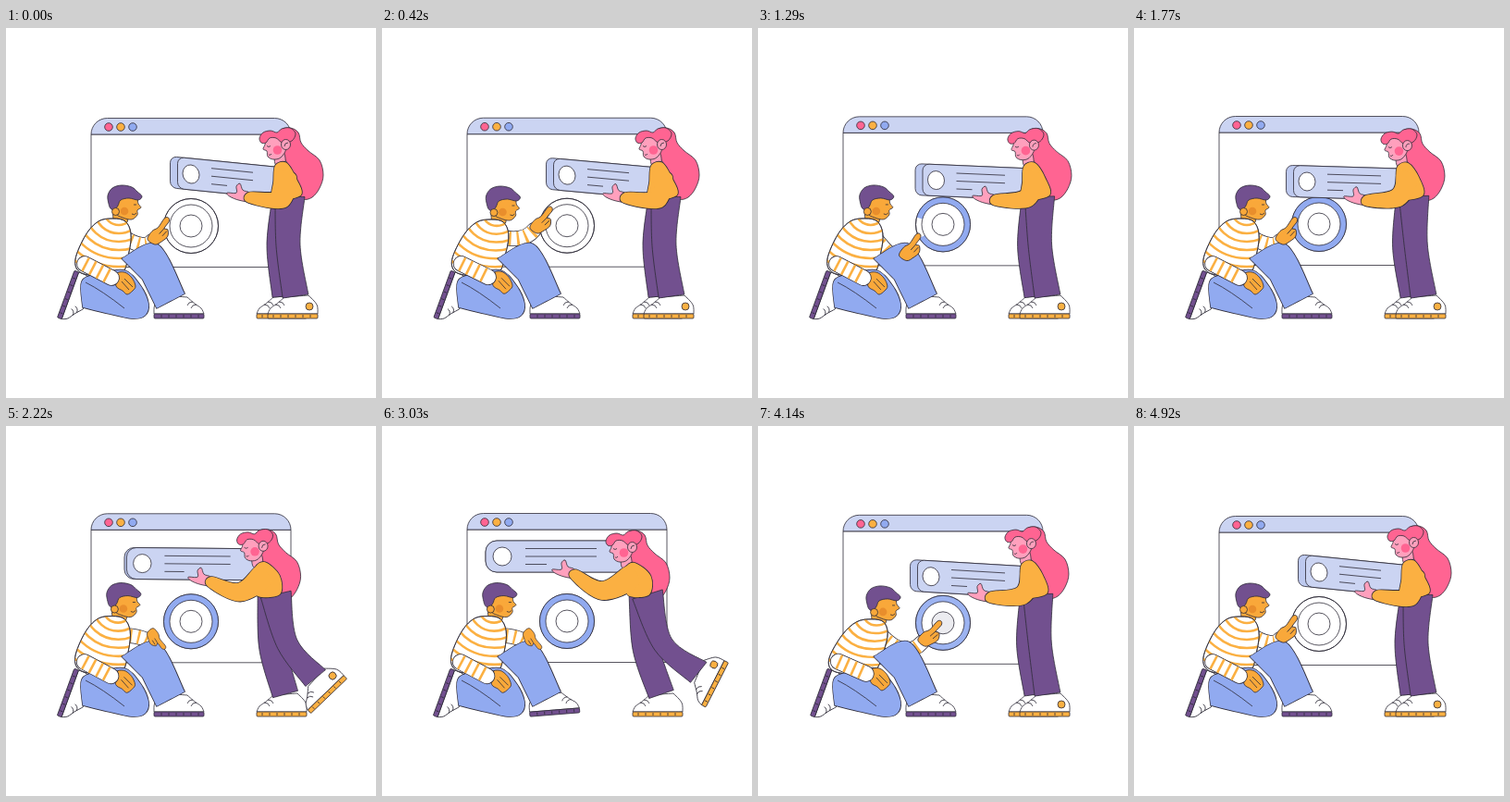
Animation, 400 px wide and 400 px high, one loop 4950 ms. Source, as an HTML page with a canvas:

```html
<!DOCTYPE html>
<html lang="en">
<head>
<meta charset="utf-8">
<title>Building a page</title>
<style>
html, body { margin: 0; width: 100%; height: 100%; overflow: hidden; background: #fff; }
canvas { display: block; width: 400px; height: 400px; }
</style>
</head>
<body>
<canvas id="stage"></canvas>
<script>
const LOOP = 4950, STEP = 30, TAU = Math.PI * 2, DEG = TAU / 360;
const INK = '#2e2b38', ORANGE = '#fbb042', TAN = '#f9a83a', PINK = '#ff6492', SKIN = '#ffa0bd',
  PURPLE = '#72508f', BLUE = '#91aaf0', PALE = '#cbd4f2', WHITE = '#fff';

const canvas = document.getElementById('stage');
const dpr = window.devicePixelRatio || 1;
canvas.width = canvas.height = 400 * dpr;
const c = canvas.getContext('2d');

function ease(t, from, to) {
  const u = Math.min(1, Math.max(0, (t - from) / (to - from)));
  return u * u * (3 - 2 * u);
}
const pulse = (t, a, b, d, e) => ease(t, a, b) - ease(t, d, e);
const mix = (a, b, u) => a.map((v, i) => v + (b[i] - v) * u);

function paint(fill, line = INK) {
  if (fill) { c.fillStyle = fill; c.fill(); }
  if (line) { c.strokeStyle = line; c.stroke(); }
}

// Closed smooth path; a repeated point makes a corner.
function trace(p) {
  const n = p.length / 2;
  const at = i => { const j = (i + n) % n * 2; return [p[j], p[j + 1]]; };
  c.beginPath();
  c.moveTo(p[0], p[1]);
  for (let i = 0; i < n; i++) {
    const [ax, ay] = at(i - 1), [bx, by] = at(i), [dx, dy] = at(i + 1), [ex, ey] = at(i + 2);
    if (bx === dx && by === dy) continue;
    c.bezierCurveTo(bx + (dx - ax) / 6, by + (dy - ay) / 6, dx - (ex - bx) / 6, dy - (ey - by) / 6, dx, dy);
  }
  c.closePath();
}
function blob(p, fill, line) { trace(p); paint(fill, line); }

// Several shapes sharing one outer outline.
function merge(fill, ...shapes) {
  c.lineWidth *= 2;
  shapes.forEach(p => blob(p));
  c.lineWidth /= 2;
  shapes.forEach(p => blob(p, fill, null));
}

// Outline around joints [x, y, radius]; cut ends are square.
function limb(joints, cut) {
  const left = [], right = [], last = joints.length - 1;
  joints.forEach(([x, y, r], i) => {
    const a = joints[Math.max(i - 1, 0)], b = joints[Math.min(i + 1, last)];
    const dir = Math.atan2(b[1] - a[1], b[0] - a[0]);
    const nx = -Math.sin(dir) * r, ny = Math.cos(dir) * r;
    for (let k = cut && i % last === 0 ? 2 : 1; k; k--) {
      left.push([x + nx, y + ny]);
      right.unshift([x - nx, y - ny]);
    }
  });
  return [...left, ...right].flat();
}

function oval(x, y, rx, ry, fill, line) {
  c.beginPath();
  c.ellipse(x, y, rx, ry, 0, 0, TAU);
  paint(fill, line);
}
const disc = (x, y, r, fill, line) => oval(x, y, r, r, fill, line);

function box(x, y, w, h, radii, fill) {
  c.beginPath();
  c.roundRect(x, y, w, h, radii);
  paint(fill);
}

function curve(d) {
  c.strokeStyle = INK;
  c.stroke(new Path2D(d));
}

function group(x, y, draw, angle = 0, sx = 1, sy = 1) {
  c.save();
  c.translate(x, y);
  c.rotate(angle);
  c.scale(sx, sy);
  draw();
  c.restore();
}

// Toe at the origin, heel to the right.
function shoe(sole, dot) {
  blob([0, -5, 0, -5, 3, -11, 10, -16, 18, -23, 18, -23, 44, -25, 44, -25, 53, -15, 54, -5, 54, -5], WHITE);
  curve('M8-15q5 0 6 4M12-18q5 0 6 4');
  box(0, -5, 54, 5, 1, sole);
  for (let x = 6; x < 54; x += 8) curve(`M${x}-4v3`);
  if (dot) disc(45, -13, 4, ORANGE);
}

function striped(path, width) {
  const layer = (w, col) => { c.lineWidth = w; c.strokeStyle = col; c.stroke(path); };
  c.save();
  c.lineCap = 'round';
  layer(width + 1.6, INK);
  layer(width, WHITE);
  c.lineCap = 'butt';
  c.setLineDash([2.6, 6]);
  layer(width, ORANGE);
  c.restore();
}

function browser() {
  box(92, 115, 216, 143.5, 0, WHITE);
  box(92, 97.5, 216, 17.5, [20, 20, 0, 0], PALE);
  [PINK, ORANGE, BLUE].forEach((col, i) => disc(111 + 13 * i, 107, 4.3, col));
}

function dial(t, turn) {
  const start = 195 * DEG;
  disc(0, 0, 29.5, WHITE);
  if (turn > 0) {
    c.save();
    c.globalAlpha = 1 - ease(t, 4050, 4500);
    c.lineWidth = 6.5;
    c.beginPath();
    c.arc(0, 0, 26.2, start, start + turn * TAU);
    paint(null, BLUE);
    c.restore();
  }
  disc(0, 0, 29.5);
  disc(0, 0, 23);
  disc(0, 0, 12, `rgba(236,236,240,${pulse(t, 4000, 4130, 4150, 4350)})`);
}

function card(k, right) {
  const left = -14.5 - 3.5 * k.step, depth = 8 * (1 - k.step), r = 7 + 5 * k.step;
  c.save();
  c.transform(1, k.tilt, 0, 1, k.x, k.y);
  for (const [d, fill] of [[depth, '#bdc9ef'], [0, PALE]])
    box(left - d, -17, right - k.x - left + d, 34, [r, 0, 0, r], fill);
  oval(0, 0, 9 + k.step, 10, WHITE);
  const from = 22 + 3 * k.step, to = 67 + 13 * k.reach + 22 * k.step;
  curve(`M${from}-8.5H${to}M${from} 0H${to}M${from} 8.5h${17 + 6 * k.step}`);
  c.restore();
}

// Joints standing upright and leaning forward.
const pose = (upright, forward) => u => upright.map((j, i) => mix(j, forward[i], u));
const TORSO = pose([[297, 147, 6], [301, 163, 12], [304, 183, 15]], [[268, 151, 6], [277, 166, 14], [278, 183, 11]]);
const ARM = pose([[303, 158, 11], [298, 185, 10]], [[272, 162, 12], [238, 178, 10]]);
const FAR_LEG = pose([[299, 183, 11], [297, 235, 15]], [[277, 183, 10], [285, 240, 14]]);
const NEAR_LEG = pose([[307, 182, 16], [305, 235, 13]], [[287, 182, 17], [304, 236, 11]]);

function womanHair() {
  blob([297, 112, 307, 108, 316, 113, 319, 124, 327, 133, 339, 143, 343, 159, 339, 173,
    331, 183, 321, 185, 313, 176, 309, 158, 304, 146, 299, 136], PINK);
}
function womanHead() {
  blob([282, 118, 280, 126, 278, 131, 282, 133, 283, 139, 289, 142, 297, 140, 303, 130, 300, 117], SKIN);
  disc(293.5, 132, 4.8, PINK, null);
  curve('M282 127.500q2 2 4 0M284 137q2 1 3-1');
  blob([274, 119, 278, 113, 286, 111, 293, 113, 298, 109, 307, 108, 313, 114, 309, 122, 299, 124,
    292, 119, 285, 119, 281, 124, 276, 124], PINK);
  oval(302.5, 126, 5, 5.5, SKIN);
  curve('M301 128q0-4 4-4');
}

function woman(k) {
  const head = draw => group(-32 * k.lean, 5 * k.lean, draw);
  head(womanHair);
  group(271, 314, () => shoe(ORANGE));

  // The lifted foot swings up on its toe and carries the ankle.
  const tx = 283 + 67 * k.step, ty = 314 - 10 * k.step ** 3, turn = -63 * DEG * k.step;
  const cos = Math.cos(turn), sin = Math.sin(turn);
  group(tx, ty, () => shoe(ORANGE, true), turn);
  const ankle = [tx + 30 * cos + 24 * sin, ty + 30 * sin - 24 * cos, 14];
  blob(limb([...FAR_LEG(k.lean), [302, 290, 14]], true), PURPLE);
  blob(limb([...NEAR_LEG(k.lean), ankle], true), PURPLE);

  head(() => blob([291, 136, 300, 134, 302, 147, 296, 150, 291, 147], SKIN));
  const wx = 262 - 12 * k.reach - 43 * k.step;
  const wy = k.y + 19 + k.tilt * (wx - k.x);
  group(wx, wy, () => blob([-23, -5, -13, -5, -13, -12, -9, -15, -6, -8, 1, -5, 1, 4, -10, 3, -20, -1], SKIN));
  merge(ORANGE, limb(TORSO(k.lean)), limb([...ARM(k.lean), [wx, wy, 5.5]]));
  head(womanHead);
}

function pointingHand() {
  blob([-1, -5, 9, -6, 16, -3, 28, -3, 31, 0, 28, 3, 19, 3, 20, 7, 14, 11, 6, 9, -1, 5], TAN);
  curve('M19 3L11 2M18 7L11 6');
}

function manHead() {
  blob([120, 184, 132, 180, 141, 182, 143, 190, 146, 194, 142, 197, 142, 202, 136, 207, 126, 205, 119, 200], TAN);
  disc(128, 198, 4.3, '#e98e2c', null);
  curve('M138 191h3M136 201q3 2 5-1');
  blob([111, 190, 110, 181, 115, 173, 125, 170, 136, 172, 142, 177, 147, 182, 143, 186, 133, 184, 124, 186,
    121, 192, 117, 197, 113, 195], PURPLE);
  disc(118.5, 198.5, 4, TAN);
}

// Leaning shears the sweater about its hem.
function sweater(lean) {
  const shear = .27 * lean, squash = 1 - .11 * lean, hem = 268;
  const shape = [116, 206, 129, 209, 135, 222, 133, 242, 125, 266, 100, 268, 80, 264, 75, 250, 86, 224, 100, 209];
  c.save();
  c.transform(1, 0, -shear, squash, shear * hem, hem * (1 - squash));
  blob(shape, WHITE);
  c.save();
  c.clip();
  c.lineWidth = 2.6;
  for (let r = 14; r < 80; r += 9) oval(122, 199, r * 1.1, r, null, ORANGE);
  c.restore();
  blob(shape);
  c.restore();
}

function man(t, tip, lean, rest) {
  const angle = (-55 + 17 * lean + 107 * rest) * DEG, size = 1 - .2 * rest;
  const cos = Math.cos(angle), sin = Math.sin(angle);
  const wx = tip[0] - 31 * size * cos, wy = tip[1] - 31 * size * sin, drop = 13 * rest;
  const bend = 12 + 35 * lean;
  const head = draw => group(17 * lean, 7 * lean, draw);

  group(55.5 + 2.5 * lean, 313, () => shoe(PURPLE), -70 * DEG, 1, -1);
  striped(new Path2D(`M${126 + 17 * lean} 226Q${wx - bend * cos} ${wy - bend * sin + drop} ${wx} ${wy + drop}`), 15);
  head(() => blob([118, 196, 130, 200, 131, 210, 123, 212, 116, 206], TAN));
  sweater(lean);

  const tap = pulse(t, 2600, 3030, 3030, 3400);
  group(162, 314, () => group(52, 0, () => shoe(PURPLE), 0, -1), -.08 * tap);
  merge(BLUE,
    [82, 274, 100, 266, 128, 262, 145, 278, 154, 298, 150, 311, 136, 314, 112, 309, 83, 302, 83, 302],
    limb([[138, 262, 18], [153, 247, 17], [178, 295, 17]], true));
  curve('M86 275Q104 284 128 303');
  group(wx, wy, pointingHand, angle, size, size);

  group(7 * lean, -5 * lean, () => {
    blob([119, 266, 128, 264, 136, 270, 140, 279, 137, 284, 131, 288, 126, 284, 119, 279], TAN);
    curve('M125 274l8 9M128 271l9 9');
  });
  striped(new Path2D(`M${85 + 4 * lean} ${255 - lean}L${114 + 7 * lean} ${270 - 5 * lean}`), 16);
  head(manHead);
}

function draw(t) {
  c.setTransform(dpr, 0, 0, dpr, 0, 0);
  c.fillStyle = WHITE;
  c.fillRect(0, 0, 400, 400);
  c.lineWidth = .8;
  c.lineJoin = 'round';

  const step = pulse(t, 1770, 2480, 3500, 4140);
  const reach = pulse(t, 700, 1770, 4140, 4900);
  const settle = pulse(t, 0, 1770, 3700, 4700);
  const k = {
    step, reach, lean: .22 * reach + .78 * step,
    x: 200 - 13 * reach - 57 * step, y: 158 + 8 * settle - 25 * step,
    tilt: .1 - .07 * settle - .03 * step
  };

  // The fingertip circles the dial ahead of the fill, rests on the knee, then presses.
  const turn = ease(t, 200, 1600);
  const rest = pulse(t, 1800, 2150, 3650, 4050);
  const press = pulse(t, 3750, 4080, 4300, 4850);
  const start = 200 * DEG, angle = start + turn * TAU + .4 * Math.sin(turn * Math.PI);
  const tip = [
    175.5 - 3.5 * rest + 22.5 * press + 28 * (Math.cos(angle) - Math.cos(start)),
    205 + 36 * rest + 6 * press + 28 * (Math.sin(angle) - Math.sin(start))];

  const rise = -2 * settle - step;
  group(0, rise, browser);
  group(200, 214 + rise, () => dial(t, turn));
  card(k, TORSO(k.lean)[0][0]);
  woman(k);
  man(t, tip, (tip[0] - 175.5) / 54, rest);
}

function tick(now) {
  draw(Math.floor(now % LOOP / STEP) * STEP);
  requestAnimationFrame(tick);
}
draw(0);
requestAnimationFrame(tick);
</script>
</body>
</html>
```
